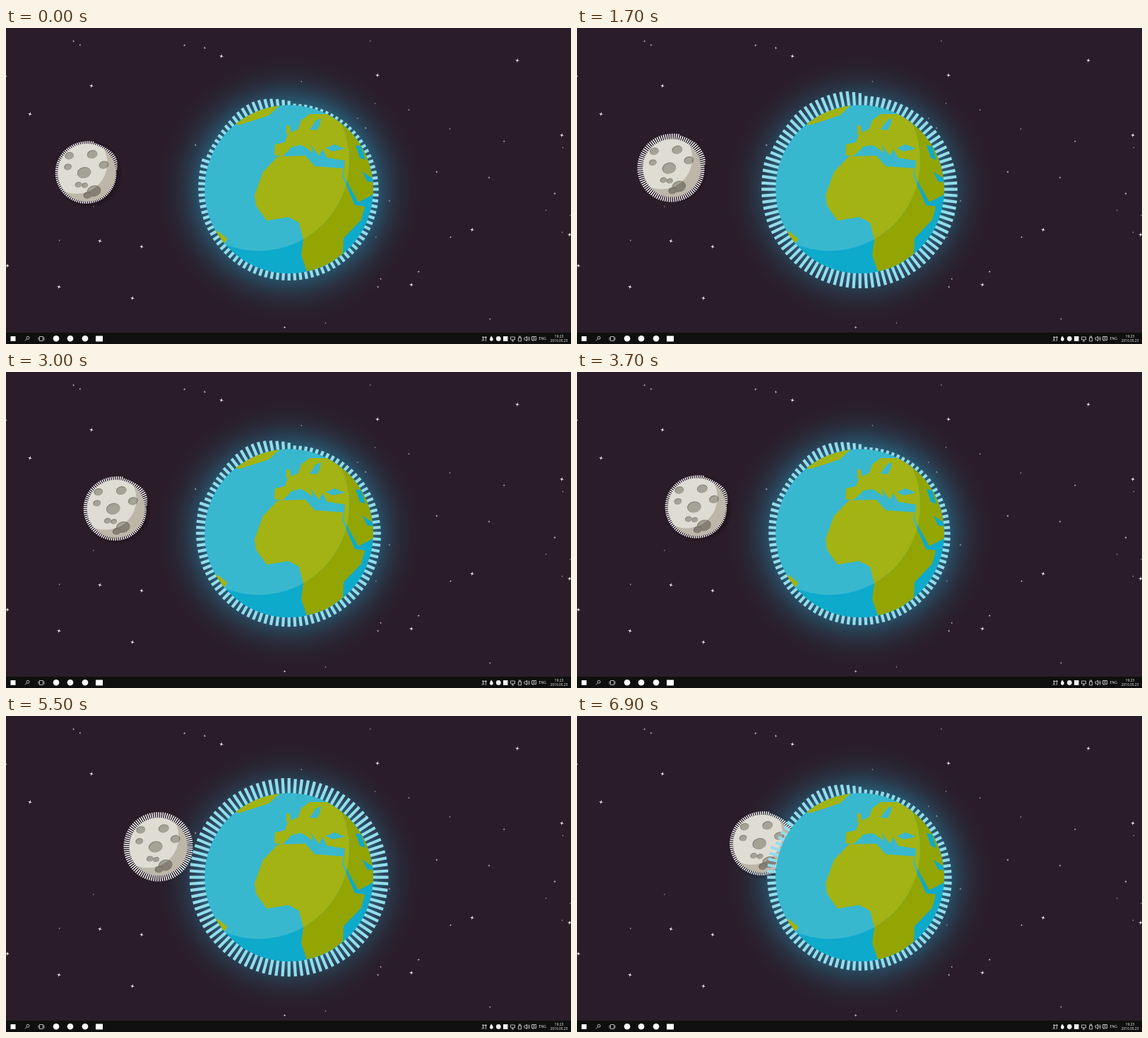
These frames come from a looping animation (800x448 px, 7000 ms). An HTML page with a canvas:

```html
<!DOCTYPE html>
<html lang="en">
<head>
<meta charset="utf-8">
<title>Planet visualizer</title>
<style>
html, body { margin: 0; width: 100%; height: 100%; overflow: hidden; background: #2a1c28; }
canvas { display: block; }
</style>
</head>
<body>
<canvas id="stage" width="800" height="448"></canvas>
<script>
const W = 800, H = 448, LOOP = 7000, STEP = 100, TAU = Math.PI * 2;
const EARTH = { x: 400.7, y: 228.7, r: 119.3 };
const MOON_R = 41;
const MAX_BAR = 21.5;

// Loudness as [seconds, extra bar length]
const BEATS = [[0, 0], [.9, 18], [2.4, 5], [3.7, 1], [4.5, 6], [5.5, 18], [6.9, 3]];

const BRIGHT_STARS = [[34, 122], [305, 40], [526, 67], [787, 152], [2, 337], [133, 302], [192, 310],
  [179, 383], [75, 367], [660, 286], [574, 364], [798, 293], [724, 46], [121, 82]];

const CRATERS = [[-4, 0, 10], [-25, -24, 6.5], [7.5, -26, 7.5], [24, -11, 7], [-27, -8, 5.5],
  [-12, 17, 5], [-3, 18, 4.5], [10, 26, 10], [1, 32, 6]];

const AFRICA = [385,182, 364,204, 352,237, 354,252, 369,273, 400,268, 415,276, 421,300, 418,322,
  426,345, 450,340, 477,320, 478,298, 503,272, 508,253, 494,251, 476,209, 478,199, 437,196, 424,181];
const EURASIA = [381,165, 395,162, 399,151, 414,143, 418,131, 430,122, 465,122, 530,140, 522,235,
  499,247, 478,209, 480,188, 455,184, 448,172, 443,181, 431,165, 435,177, 419,166, 406,168, 391,182, 380,180];
const GREENLAND = [329,138, 315,130, 370,100, 389,109, 372,124];
const AMERICA = [285,286, 300,288, 314,299, 306,309, 290,310];
const BRITAIN = [397,138, 401,138, 404,149, 397,151];
const LANDS = [AFRICA, EURASIA, GREENLAND, AMERICA, BRITAIN];

const BALTIC = [430,144, 439,131, 446,128, 444,138, 440,145];
const BLACK_SEA = [453,170, 465,165, 480,171, 462,175];
const CASPIAN = [495,166, 503,168, 509,187, 501,184];
const GULF = [505,204, 522,215, 520,219, 511,217];
const SEAS = [BALTIC, BLACK_SEA, CASPIAN, GULF];

const ctx = document.getElementById("stage").getContext("2d");

function layer(draw) {
  const c = document.createElement("canvas");
  c.width = W;
  c.height = H;
  draw(c.getContext("2d"));
  return c;
}

function seededRandom(seed) {
  return () => (seed = seed * 16807 % 2147483647) / 2147483647;
}

function disc(g, x, y, r, fill) {
  g.fillStyle = fill;
  g.beginPath();
  g.arc(x, y, r, 0, TAU);
  g.fill();
}

function clipDisc(g, x, y, r) {
  g.beginPath();
  g.arc(x, y, r, 0, TAU);
  g.clip();
}

function polygons(g, shapes, fill) {
  g.fillStyle = fill;
  for (const p of shapes) {
    g.beginPath();
    for (let i = 0; i < p.length; i += 2) g.lineTo(p[i], p[i + 1]);
    g.fill();
  }
}

function star(g, x, y, r, alpha) {
  g.fillStyle = `rgba(255,250,250,${alpha})`;
  g.beginPath();
  for (let i = 0; i < 8; i++) {
    const a = i * TAU / 8 + .2, d = i % 2 ? r * .3 : r;
    g.lineTo(x + d * Math.cos(a), y + d * Math.sin(a));
  }
  g.fill();
}

function drawStars(g) {
  const random = seededRandom(77);
  for (let i = 0; i < 34; i++) {
    star(g, random() * W, 15 + random() * 415, 1.2 + random(), .8);
  }
  BRIGHT_STARS.forEach(([x, y]) => star(g, x, y, 3.1, 1));
}

function drawGlow(g) {
  const reach = 205, inner = 112;
  const glow = g.createRadialGradient(EARTH.x, EARTH.y, inner, EARTH.x, EARTH.y, reach);
  for (let f = 0; f <= 1; f += .125) {
    glow.addColorStop(f, `rgba(38,135,170,${.8 * (1 - f) ** 2.7})`);
  }
  disc(g, EARTH.x, EARTH.y, reach, glow);
}

function drawTaskbar(g) {
  g.fillStyle = "#100f10";
  g.fillRect(0, 432, W, 16);
  g.fillStyle = "#fff";
  g.fillRect(6.5, 437, 7, 7);
  g.fillRect(127, 436.5, 10, 8);
  for (const x of [71, 91, 112]) disc(g, x, 440.3, 4.3, "#fff");

  g.strokeStyle = "#ddd";
  g.lineWidth = .8;
  const outline = path => g.stroke(new Path2D(path));
  outline("M29 439.3a2 2 0 1 1 4 0a2 2 0 1 1-4 0M29.5 440.8L26.8 443.6");
  outline("M47.5 437.5h5v6h-5zM46 438.5v4M54 438.5v4");
  outline("M674 438.5h7M675.5 437v4l-1.5 3M675.5 441l1.5 3M679.5 437v7");
  outline("M714.5 438h6v4h-6zM716 444h3M717.5 442v2");
  outline("M725.5 439h4v5h-4zM726.5 439v-2h2v2");
  outline("M734 439h1.5l2-2v7l-2-2H734zM739 438.5q1.2 2 0 4M740.5 437.5q2 3 0 6");
  outline("M744.5 437.5h6v5h-3l-1.5 1.5v-1.5h-1.5zM746 439h3M746 441h3");
  g.fillStyle = "#fff";
  g.fill(new Path2D("M687 436.5q4.5 5 1.5 7q-3 1-3.5-2q0-2 2-5z"));
  disc(g, 697.3, 440.5, 3.4, "#eee");
  g.fillRect(704, 437, 6.5, 7);

  g.fillStyle = "#f4f4f4";
  g.textAlign = "center";
  g.font = "5px 'Open Sans', sans-serif";
  g.fillText("ENG", 759.7, 442);
  g.fillText("19:23", 783, 438.6);
  g.font = "4.8px 'Open Sans', sans-serif";
  g.fillText("2016.05.23", 783, 445.4);
}

const backdrop = layer(g => {
  g.fillStyle = "#2a1c28";
  g.fillRect(0, 0, W, H);
  drawStars(g);
  drawGlow(g);
  drawTaskbar(g);
});

const earth = layer(g => {
  const paint = (water, land) => {
    g.fillStyle = water;
    g.fillRect(0, 0, W, H);
    polygons(g, LANDS, land);
    polygons(g, SEAS, water);
  };
  clipDisc(g, EARTH.x, EARTH.y, EARTH.r);
  paint("#0eaacb", "#92a503");
  clipDisc(g, 358, 188, 128);
  paint("#38b8cf", "#a2b313");
});

function loudness(t) {
  const next = Math.max(1, BEATS.findIndex(([time]) => time >= t));
  const [t0, a] = BEATS[next - 1], [t1, b] = BEATS[next];
  return a + (b - a) * (t - t0) / (t1 - t0);
}

// u runs once around the ring, anticlockwise
function barLength(u, gain) {
  const swell = 2 + 8 * Math.sin(Math.PI * u);
  const bass = 11 * Math.exp(-(((u - .06) / .06) ** 2));
  const snare = u > .19 ? 5 * Math.exp((.19 - u) / .05) : 0;
  return Math.min(MAX_BAR, swell + bass + snare + gain);
}

function drawBars({ x, y, r, count, start, scale, width, colour }, gain) {
  ctx.strokeStyle = colour;
  ctx.lineWidth = width;
  ctx.beginPath();
  for (let i = 0; i < count; i++) {
    const a = start - i / count * TAU;
    const dx = Math.sin(a), dy = -Math.cos(a);
    const end = r + scale * barLength(i / count, gain);
    ctx.moveTo(x + dx * (r - 1.5), y + dy * (r - 1.5));
    ctx.lineTo(x + dx * end, y + dy * end);
  }
  ctx.stroke();
}

function drawMoon(t, gain) {
  const x = 114.5 + t * (9.3 + t * (1.27 + t * .07));
  const y = 205 - t * (3.9 - t * .06);
  const shade = ctx.createRadialGradient(x + 2, y + 2, MOON_R, x + 2, y + 2, 49);
  shade.addColorStop(0, "rgba(15,8,14,.4)");
  shade.addColorStop(1, "rgba(15,8,14,0)");
  disc(ctx, x + 2, y + 2, 49, shade);
  drawBars({ x, y, r: MOON_R, count: 96, start: 83 / 360 * TAU, scale: .38, width: 1.4, colour: "#fff" }, gain);

  ctx.save();
  ctx.translate(x, y);
  clipDisc(ctx, 0, 0, MOON_R);
  const crater = (cx, cy, r, fill) => {
    ctx.fillStyle = fill;
    ctx.beginPath();
    ctx.ellipse(cx, cy, r, r * .78, -.25, 0, TAU);
    ctx.fill();
  };
  const paint = (ground, rim, floor) => {
    disc(ctx, 0, 0, MOON_R + 1, ground);
    for (const [cx, cy, r] of CRATERS) {
      crater(cx, cy, r, rim);
      crater(cx + .5, cy + .6, r - .8, floor);
    }
  };
  paint("#bcb7a8", "#6f6c62", "#848074");
  clipDisc(ctx, -15, -14, 44);
  paint("#dfdcd4", "#89867b", "#a5a296");
  ctx.restore();
}

function frame(now) {
  const t = Math.floor(now % LOOP / STEP) * STEP / 1000;
  const gain = loudness(t);
  ctx.drawImage(backdrop, 0, 0);
  drawMoon(t, gain);
  drawBars({ ...EARTH, count: 96, start: 0, scale: 1, width: 4.2, colour: "#94dcec" }, gain);
  ctx.drawImage(earth, 0, 0);
}

const began = performance.now();
function tick() {
  frame(performance.now() - began);
  requestAnimationFrame(tick);
}
tick();
</script>
</body>
</html>
```
